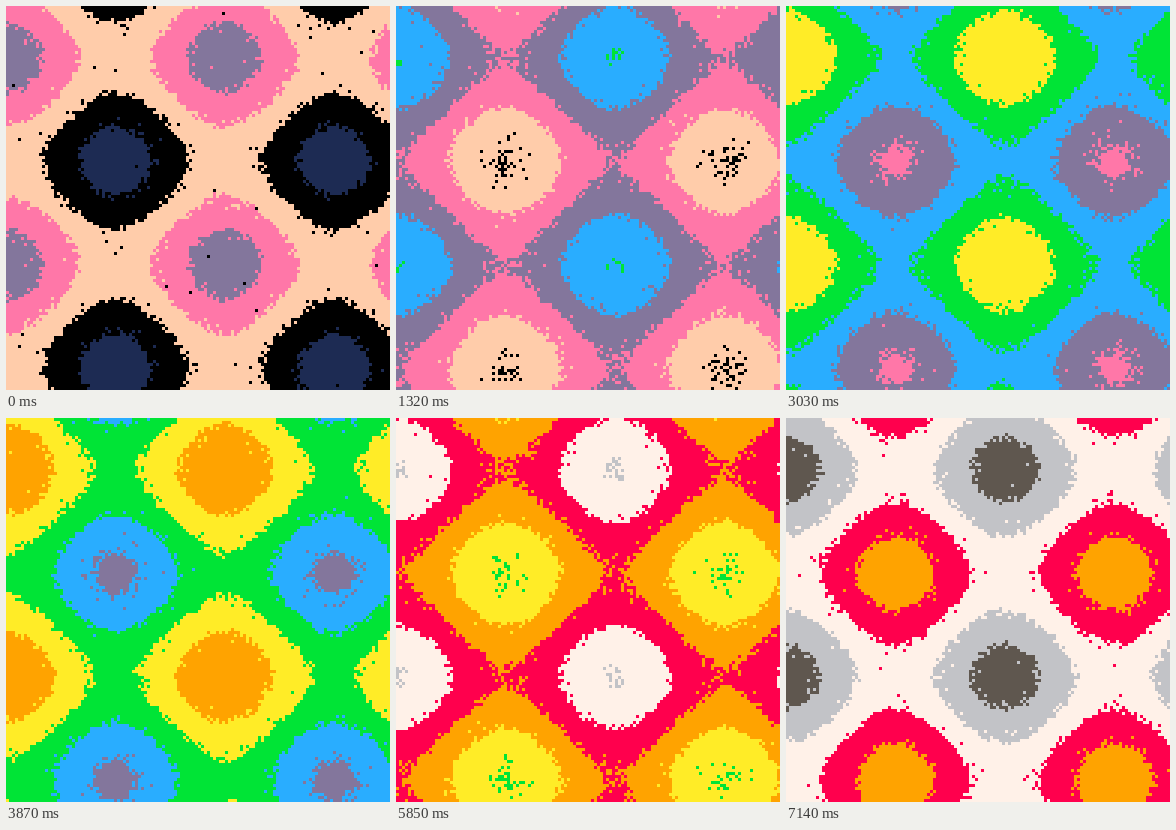
Write an HTML page with a canvas that moves like this. It is 384x384 px and loops after 7170 ms.

```html
<!DOCTYPE html>
<html lang="en">
<head>
<meta charset="utf-8">
<title>Plasma</title>
<style>
html, body { margin: 0; width: 100%; height: 100%; overflow: hidden; background: #000; }
canvas { display: block; width: 384px; height: 384px; image-rendering: pixelated; }
</style>
</head>
<body>
<canvas id="stage" width="128" height="128"></canvas>
<script>
const SIZE = 128;
const STEP_MS = 30;
const STEPS = 239;
const WARMUP = 17;       // steps already painted when the loop starts
const REPAINT = 0.31;    // chance that a pixel is repainted in one step
const TAU = Math.PI * 2;

const palette = [
  '000000', '1d2b53', '7e2553', '008751', 'ab5236', '5f574f', 'c2c3c7', 'fff1e8',
  'ff004d', 'ffa300', 'ffec27', '00e436', '29adff', '83769c', 'ff77a8', 'ffccaa'
].map(hex => {
  const n = parseInt(hex, 16);
  return (0xff000000 | (n & 255) << 16 | (n & 0xff00) | n >> 16) >>> 0;
});

const ctx = document.getElementById('stage').getContext('2d');
const image = ctx.createImageData(SIZE, SIZE);
const pixels = new Uint32Array(image.data.buffer);

function hash(a, b) {
  let h = Math.imul(a + 1, 0x9e3779b1) ^ Math.imul(b + 1, 0x85ebca77);
  h = Math.imul(h ^ h >>> 15, 0x2c1b3c6d);
  h = Math.imul(h ^ h >>> 12, 0x297a2d39);
  return (h ^ h >>> 15) >>> 0;
}

const limit = REPAINT * 2 ** 32;

// Each pixel keeps the colour of the last step in which it was repainted.
function colorAt(x, y, step) {
  const id = y * SIZE + x;
  let last = step;
  while (last > 0 && hash(id, last) >= limit) last--;
  if (last === 0) return 0;
  const bits = hash(id + 40000, last);
  const px = x + (bits & 1023) / 1024;
  const py = y + (bits >>> 10 & 1023) / 1024;
  const wave = -Math.cos(TAU * px / 73) - Math.sin(TAU * py / 69);
  return Math.floor(wave - last / 30) & 15;
}

let shown = -1;

function draw(now) {
  const index = Math.floor(now / STEP_MS) % STEPS;
  if (index !== shown) {
    shown = index;
    for (let y = 0, i = 0; y < SIZE; y++) {
      for (let x = 0; x < SIZE; x++) pixels[i++] = palette[colorAt(x, y, index + WARMUP)];
    }
    ctx.putImageData(image, 0, 0);
  }
}

const start = performance.now();

function tick() {
  draw(performance.now() - start);
  requestAnimationFrame(tick);
}
tick();
</script>
</body>
</html>
```
